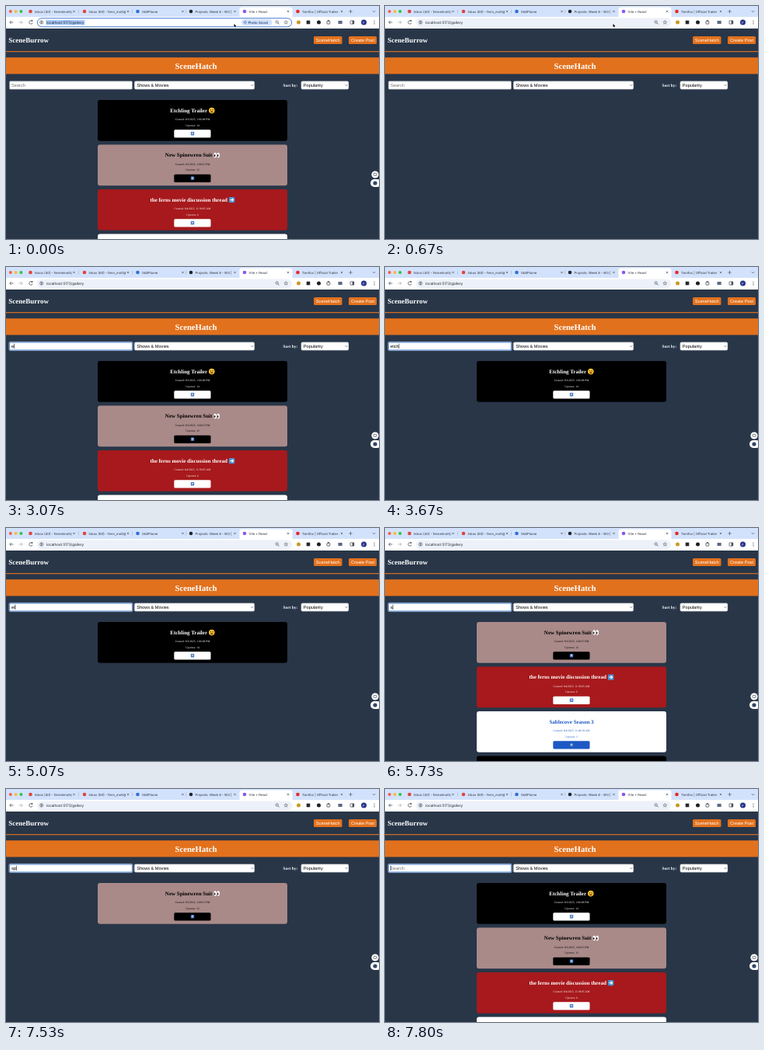
Animation of 480 by 300 pixels, one loop 8 s. Source, as an HTML page with a canvas:

```html
<!DOCTYPE html>
<html lang="en">
<head>
<meta charset="utf-8">
<title>Gallery search</title>
<style>
  html, body { margin: 0; width: 100%; height: 100%; overflow: hidden; background: #283648; }
  canvas { display: block; width: 480px; height: 300px; }
</style>
</head>
<body>
<canvas id="stage"></canvas>
<script>
const canvas = document.getElementById('stage');
const ctx = canvas.getContext('2d');
const scale = window.devicePixelRatio || 1;
canvas.width = 480 * scale;
canvas.height = 300 * scale;

const LOOP = 8000;
const SERIF = '"Liberation Serif", serif';
const SANS = '"Liberation Sans", sans-serif';
const UI = 'Inter, sans-serif';
const ORANGE = '#e2711d';
const SLATE = '#283648';
const INK = '#41464d';

const posts = [
  { title: 'Etchling Trailer', emoji: face, date: '8/3/2025, 1:06:08 PM', votes: 14, bg: '#000', fg: '#fff', btn: '#fff' },
  { title: 'New Spinewren Suit', emoji: eyes, date: '8/3/2025, 1:08:15 PM', votes: 12, bg: '#a98a89', fg: '#000', btn: '#000' },
  { title: 'the ferns movie discussion thread', emoji: arrowRight, date: '8/4/2025, 11:39:05 AM', votes: 6, bg: '#a7191c', fg: '#fff', btn: '#fff' },
  { title: 'Sablecove Season 3', date: '8/4/2025, 11:48:39 AM', votes: 3, bg: '#fff', fg: '#1d58c4', btn: '#1d58c4' },
  { title: 'Short Scenes', date: '8/4/2025, 11:52:10 AM', votes: 1, bg: '#000', fg: '#fff', btn: '#fff' }
];

// Search field contents over time; the field gets focus at the first entry.
const typing = [
  [2200, ''], [3000, 'e'], [3330, 'et'], [3530, 'etc'], [3670, 'etch'], [3870, 'etchl'],
  [4930, 'etch'], [5000, 'etc'], [5070, 'et'], [5130, 'e'], [5200, ''],
  [5600, 's'], [5800, 'sp'], [6130, 'spi'], [6400, 'spin'], [6530, 'spine'],
  [7400, 'spin'], [7470, 'spi'], [7530, 'sp'], [7670, 's'], [7730, '']
];

function rect(x, y, w, h, fill, r = 0) {
  ctx.fillStyle = fill;
  ctx.beginPath();
  ctx.roundRect(x, y, w, h, r);
  ctx.fill();
}

function frame(x, y, w, h, color, width, r = 0) {
  ctx.strokeStyle = color;
  ctx.lineWidth = width;
  ctx.beginPath();
  ctx.roundRect(x, y, w, h, r);
  ctx.stroke();
}

function dot(x, y, r, fill) {
  ctx.fillStyle = fill;
  ctx.beginPath();
  ctx.arc(x, y, r, 0, 7);
  ctx.fill();
}

function ring(x, y, r, color, width, from = 0, to = 7) {
  ctx.strokeStyle = color;
  ctx.lineWidth = width;
  ctx.beginPath();
  ctx.arc(x, y, r, from, to);
  ctx.stroke();
}

function oval(x, y, rx, ry, fill) {
  ctx.fillStyle = fill;
  ctx.beginPath();
  ctx.ellipse(x, y, rx, ry, 0, 0, 7);
  ctx.fill();
}

function line(points, color, width) {
  ctx.strokeStyle = color;
  ctx.lineWidth = width;
  ctx.beginPath();
  for (const [x, y] of points) ctx.lineTo(x, y);
  ctx.stroke();
}

function text(str, x, y, font, fill, align = 'left') {
  ctx.font = font;
  ctx.fillStyle = fill;
  ctx.textAlign = align;
  ctx.fillText(str, x, y);
}

function cross(x, y) {
  line([[x - 1.2, y - 1.2], [x + 1.2, y + 1.2]], INK, 0.6);
  line([[x - 1.2, y + 1.2], [x + 1.2, y - 1.2]], INK, 0.6);
}

// Emoji are drawn inside an 8 px box whose left middle is (x, y).
function face(x, y) {
  dot(x + 4, y, 3.8, '#f9c433');
  dot(x + 2.6, y - 0.9, 0.7, '#5b3413');
  dot(x + 5.4, y - 0.9, 0.7, '#5b3413');
  oval(x + 4, y + 1.6, 1.7, 1, '#7a3b14');
}

function eyes(x, y) {
  for (const dx of [2, 6]) {
    oval(x + dx, y, 1.8, 3.3, '#fff');
    oval(x + dx - 0.6, y + 0.4, 0.9, 1.5, '#2b1d18');
  }
}

function arrowRight(x, y) {
  rect(x + 0.3, y - 3.6, 7.4, 7.2, '#4a90d0', 1.2);
  line([[x + 1.8, y], [x + 6, y]], '#fff', 1.2);
  line([[x + 4, y - 1.9], [x + 6, y], [x + 4, y + 1.9]], '#fff', 1.1);
}

function arrowUp(x, y) {
  rect(x - 2.2, y - 2.2, 4.4, 4.4, '#3f74bd', 0.7);
  line([[x, y + 1.4], [x, y - 1.3]], '#fff', 0.7);
  line([[x - 1.2, y - 0.1], [x, y - 1.3], [x + 1.2, y - 0.1]], '#fff', 0.7);
}

function tab(x, label, color, width, closeX) {
  dot(x, 7, 2.3, color);
  ctx.save();
  ctx.beginPath();
  ctx.rect(x + 5, 0, width, 14);
  ctx.clip();
  text(label, x + 5.5, 8.5, `4.2px ${UI}`, '#2a3038');
  ctx.restore();
  cross(closeX, 7);
}

function drawTabs() {
  rect(0, 0, 480, 14, '#d3e2fc');
  rect(300.5, 1.5, 68, 14, '#fff', 3);
  dot(5.8, 7, 2, '#fb5b54');
  dot(12.6, 7, 2, '#f8bc30');
  dot(19.4, 7, 2, '#2cc640');
  tab(31.5, 'Inbox (40) - fennelmott@mail', '#e0443a', 48, 87.5);
  tab(101, 'Inbox (60) - fenn_mott@mail', '#e0443a', 48, 157);
  tab(169.5, 'SkillPlume', '#2f6fd8', 48, 227.5);
  tab(238, 'Projects: Week 8 - W3 | Class', '#22262c', 47, 294.5);
  tab(307, 'Vite + React', '#8a56f5', 48, 363);
  tab(375.5, 'Tarnfox | Official Trailer', '#ec2626', 48, 432);
  for (const x of [93.5, 162, 231]) rect(x, 4.5, 0.5, 5, '#93a9cc');
  line([[441.2, 7], [445.8, 7]], INK, 0.6);
  line([[443.5, 4.7], [443.5, 9.3]], INK, 0.6);
  line([[471.8, 6.2], [473.5, 7.9], [475.2, 6.2]], INK, 0.7);
}

function drawToolbar(focused) {
  rect(0, 14, 480, 15, '#fff');
  line([[9.5, 21], [4.8, 21]], INK, 0.7);
  line([[6.9, 18.9], [4.8, 21], [6.9, 23.1]], INK, 0.7);
  line([[16.5, 21], [21.2, 21]], '#a4a8ad', 0.7);
  line([[19.1, 18.9], [21.2, 21], [19.1, 23.1]], '#a4a8ad', 0.7);
  ring(32, 21, 2.2, INK, 0.7, 0.3, 5.6);
  rect(32.6, 18.2, 1.7, 1.7, INK);

  rect(40, 15.5, 328, 11.5, focused ? '#fff' : '#edf1f9', 5.7);
  if (focused) {
    frame(40.3, 15.8, 327.4, 11, '#2f6bd0', 0.9, 5.5);
    rect(51.5, 18, 50, 6.4, '#a9cbfa');
    rect(303, 17.3, 39.5, 7.6, '#d3e2fc', 3.8);
    ring(307.8, 21, 1.4, '#1c4a9c', 0.6);
    text('Photo Scout', 311.5, 22.6, `500 4.4px ${UI}`, '#16315f');
  }
  ring(45.7, 21, 2.1, INK, 0.6);
  oval(45.7, 21, 0.5, 2, INK);
  text('localhost:5173/gallery', 52, 22.7, `4.7px ${UI}`, '#1f2329');
  ring(348.7, 20.5, 1.6, INK, 0.7);
  line([[350, 21.8], [351.6, 23.4]], INK, 0.8);
  const star = [];
  for (let i = 0; i <= 10; i++) {
    const a = i * Math.PI / 5 - Math.PI / 2, r = i % 2 ? 1.1 : 2.5;
    star.push([360.3 + r * Math.cos(a), 21.1 + r * Math.sin(a)]);
  }
  line(star, INK, 0.5);

  dot(376.5, 21, 2.5, '#c79a24');
  rect(386.7, 18.7, 4.6, 4.6, '#25282d');
  dot(402.5, 21, 2.5, '#1e2024');
  frame(413, 19.3, 3.8, 3.8, INK, 0.8, 0.6);
  dot(415, 18.8, 0.9, INK);
  rect(427.5, 19, 5.2, 4, '#5c6a86', 0.6);
  frame(443, 18.9, 4.8, 4.2, INK, 0.7, 0.6);
  rect(445.7, 18.9, 2.1, 4.2, INK);
  dot(460.5, 21, 3.5, '#27348b');
  text('F', 460.5, 22.5, `4px ${UI}`, '#fff', 'center');
  for (const dy of [-1.9, 0, 1.9]) dot(474, 21 + dy, 0.55, INK);
}

function button(x, w, label) {
  rect(x, 39, w, 10, ORANGE, 1.5);
  text(label, x + w / 2, 46, `5.7px ${SANS}`, '#fff', 'center');
}

function drawHeader() {
  rect(0, 29, 480, 271, SLATE);
  text('SceneBurrow', 3.2, 47.2, `bold 9px ${SERIF}`, '#fff');
  button(396, 36.5, 'SceneHatch');
  button(441, 36, 'Create Post');
  rect(0, 58, 480, 1.2, '#d06c24');
  rect(0, 66.3, 480, 21.2, ORANGE);
  text('SceneHatch', 244.5, 80.6, `bold 10.7px ${SERIF}`, '#fff', 'center');
}

function select(x, w, label) {
  rect(x, 96.8, w, 10.4, '#fff', 1.6);
  frame(x, 96.8, w, 10.4, '#8b9097', 0.4, 1.6);
  text(label, x + 3, 104, `5.6px ${SANS}`, '#000');
  const r = x + w - 3;
  line([[r - 1.2, 101.4], [r, 102.6], [r + 1.2, 101.4]], '#333', 0.7);
}

function drawControls(query, focused, caret) {
  rect(4.5, 96.8, 158, 10.4, '#fff', 1.2);
  frame(4.5, 96.8, 158, 10.4, '#8b9097', 0.5, 1.2);
  if (focused) {
    frame(4, 96.4, 159, 11.2, '#dbe9fb', 0.6, 1.6);
    frame(4.6, 97, 157.8, 10, '#4b86d6', 0.9, 1.2);
  }
  text(query || 'Search', 7, 104, `5.7px ${SANS}`, query ? '#000' : '#757575');
  if (caret) rect(6.9 + (query ? ctx.measureText(query).width : 0), 98.7, 0.6, 6.3, '#000');
  select(165.2, 154.6, 'Shows & Movies');
  text('Sort by:', 356.5, 103.6, `bold 5.4px ${SERIF}`, '#fff');
  select(379.8, 61.2, 'Popularity');
}

function drawCard(post, y) {
  rect(118, y, 244, 52.8, post.bg, 3);
  ctx.font = `bold 7px ${SERIF}`;
  const tw = ctx.measureText(post.title).width;
  const x = 240 - (tw + (post.emoji ? 9.75 : 0)) / 2;
  text(post.title, x, y + 15.9, ctx.font, post.fg);
  if (post.emoji) post.emoji(x + tw + 1.75, y + 13.6);
  const small = `3.6px ${SERIF}`;
  text('Created: ' + post.date, 240, y + 26.1, small, post.fg, 'center');
  text('Upvotes: ' + post.votes, 240, y + 33.8, small, post.fg, 'center');
  rect(216.3, y + 38.2, 47.2, 10.2, post.btn, 1.5);
  arrowUp(240, y + 43.3);
}

function drawWidgets() {
  dot(475, 217, 4.6, '#fff');
  frame(473.1, 215.4, 3.8, 3, INK, 0.7, 0.8);
  rect(469, 223, 14, 10, '#fff', 5);
  dot(475, 228, 2.6, '#334766');
}

function drawPointer(x, y, beam) {
  if (beam) {
    line([[x, y - 2.5], [x, y + 2.5]], '#dfe3e8', 1.2);
    line([[x, y - 2.8], [x, y + 2.8]], '#111', 0.6);
    for (const d of [-2.8, 2.8]) line([[x - 1.3, y + d], [x + 1.3, y + d]], '#111', 0.6);
    return;
  }
  ctx.beginPath();
  for (const [dx, dy] of [[0, 0], [0, 4.2], [1, 3.3], [1.7, 4.8], [2.3, 4.5], [1.7, 3.1], [3, 3.1]]) ctx.lineTo(x + dx, y + dy);
  ctx.closePath();
  ctx.strokeStyle = '#fff';
  ctx.lineWidth = 0.8;
  ctx.stroke();
  ctx.fillStyle = '#000';
  ctx.fill();
}

function draw(t) {
  const last = typing.filter(([at]) => at <= t).pop();
  const query = last ? last[1] : '';
  const caret = !!last && (t - last[0]) % 1060 < 530;
  const loading = t >= 400 && t < 700;

  drawHeader();
  drawControls(query, !!last, caret);
  if (!loading) {
    posts.filter(p => p.title.toLowerCase().includes(query))
      .forEach((p, i) => drawCard(p, 121 + 57.5 * i));
  }
  if (t < 400 || t >= 1800) drawWidgets();
  drawTabs();
  drawToolbar(t < 70);

  if (t < 3000) {
    const k = Math.min(1, Math.max(0, (t - 700) / 830));
    const e = k * k * (3 - 2 * k);
    const x = 293.5 + (102 - 293.5) * e;
    const y = 23 + (97.3 - 23) * e;
    drawPointer(x, y, y > 95 && x < 162);
  }
}

function tick(now) {
  ctx.setTransform(scale, 0, 0, scale, 0, 0);
  ctx.textRendering = 'geometricPrecision';
  draw(now % LOOP);
  requestAnimationFrame(tick);
}
requestAnimationFrame(tick);
</script>
</body>
</html>
```
